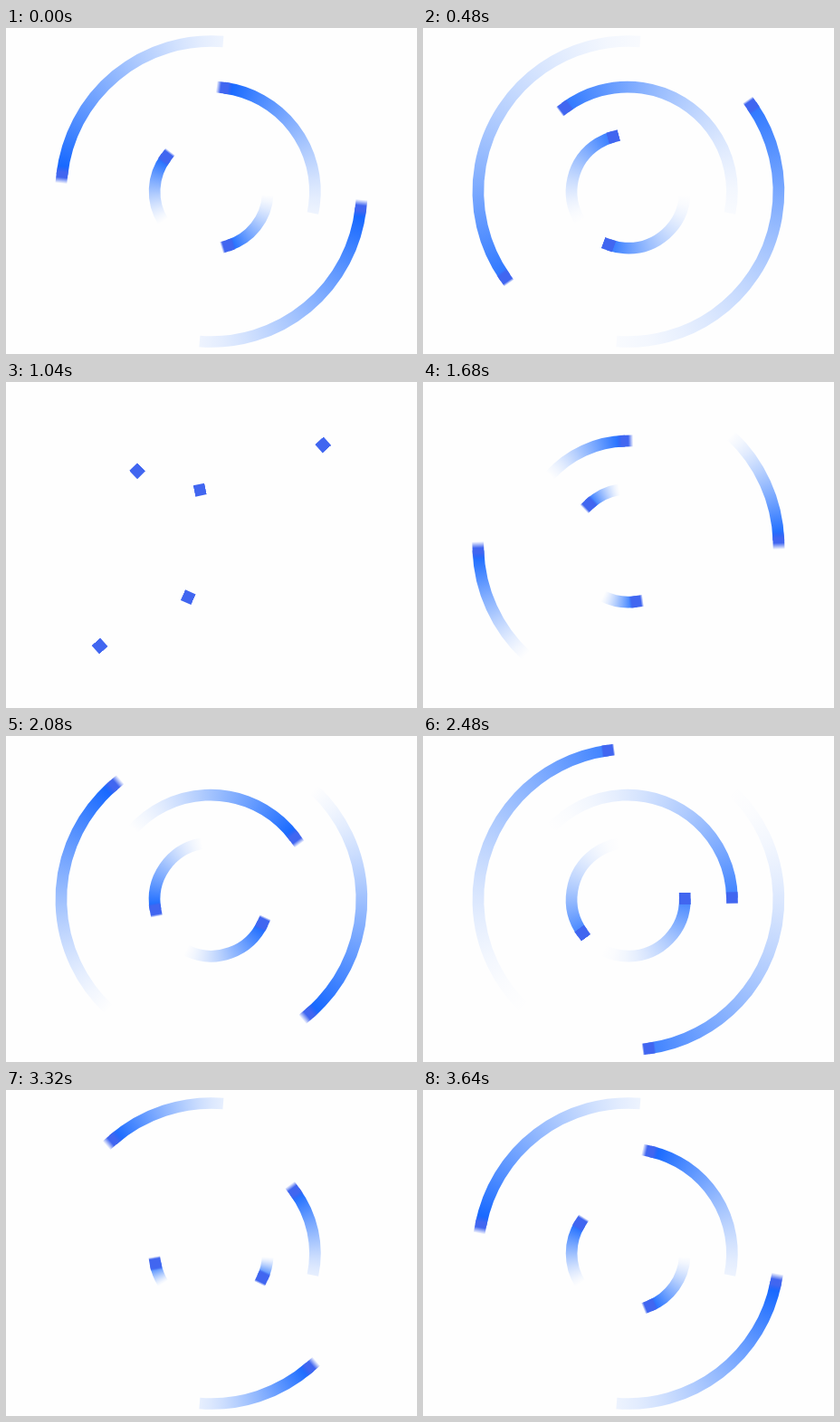
An HTML page with a canvas that plays this animation: 454x360 px, repeating every 3680 ms.

```html
<!DOCTYPE html>
<html lang="en">
<head>
<meta charset="utf-8">
<title>Orbiting arcs</title>
<style>
  html, body { margin: 0; width: 100%; height: 100%; overflow: hidden; background: #fefefe; }
  canvas { display: block; }
</style>
</head>
<body>
<canvas id="stage" width="454" height="360"></canvas>
<script>
const ctx = document.getElementById('stage').getContext('2d');
const LOOP = 3680, CY = 180.5, SIZE = 12.7, SHUTTER = 20;

// Each head swings from angle a to b and back; tails start at tailA / tailB.
const outer = { x: 226.9, r: 166, a: 138, b: 264.5, tailA: 133, tailB: 274.5 };
const middle = { x: 226, r: 115.4, a: 225.5, b: 361.5, tailA: 222, tailB: 372 };
const inner = { x: 226.7, r: 62.6, a: 258.5, b: 142.5, tailA: 261, tailB: 148, soft: true };
const turned = (arc, by) => ({
  ...arc, a: arc.a + by, b: arc.b + by, tailA: arc.tailA + by, tailB: arc.tailB + by
});
const arcs = [outer, turned(outer, -180), middle, inner, turned(inner, -144.5)];

const OUT = { start: 1110, end: 2610, fadeStart: 2360, fadeEnd: 2780, edge: 0 };
const BACK = { start: 2850, end: 4442, fadeStart: 4000, fadeEnd: 4730, edge: 0.14 };

const rad = deg => deg * Math.PI / 180;
const ramp = (t, from, to) => Math.min(1, Math.max(0, (t - from) / (to - from)));
const smooth = x => x * x * (3 - 2 * x);
const sine = x => (1 - Math.cos(Math.PI * x)) / 2;

// Time counted from the start of the outward swing.
const unroll = t => OUT.start + (((t - OUT.start) % LOOP) + LOOP) % LOOP;

function headAngle(arc, t) {
  t = unroll(t);
  let p = t < BACK.start
    ? sine(ramp(t, OUT.start, OUT.end))
    : 1 - sine(ramp(t, BACK.start, BACK.end) ** 0.85);
  if (arc.soft) p = (p + smooth(p)) / 2;
  return arc.a + (arc.b - arc.a) * p;
}

// The trail runs from the head to its anchor, then pales away from the tail on.
function drawTrail(arc, time, head) {
  const t = unroll(time);
  const swing = t < BACK.start ? OUT : BACK;
  const tail = swing === OUT ? arc.tailA : arc.tailB;
  const gone = smooth(ramp(t, swing.fadeStart, swing.fadeEnd));
  const strength = ramp(t, swing.start, swing.start + 200) * (1 - gone);
  if (!strength) return;

  const edge = arc.soft ? 0 : swing.edge * (1 - ramp(t, swing.start, swing.end));
  const first = Math.min(head, tail), last = Math.max(head, tail);
  const span = last - first, pad = 5, steps = 10;
  const fade = ctx.createConicGradient(rad(first - pad), arc.x, CY);
  for (let i = 0; i <= steps; i++) {
    const along = i / steps;
    const u = head < tail ? along : 1 - along;
    const alpha = strength * (edge + (1 - edge) * (1 - u) ** (1.3 + 2 * gone));
    fade.addColorStop((pad + along * span) / 360, `rgba(13,98,255,${alpha.toFixed(4)})`);
  }
  ctx.strokeStyle = fade;
  ctx.lineWidth = SIZE;
  ctx.beginPath();
  ctx.arc(arc.x, CY, arc.r, rad(first), rad(last));
  ctx.stroke();
}

// A square smeared along its path by the shutter time.
function drawHead(arc, t, head) {
  const moved = headAngle(arc, t + SHUTTER / 2) - headAngle(arc, t - SHUTTER / 2);
  const blur = Math.abs(rad(moved)) * arc.r;
  const length = SIZE + blur;
  const fill = ctx.createLinearGradient(0, -length / 2, 0, length / 2);
  fill.addColorStop(0, 'rgba(65,102,240,0)');
  fill.addColorStop(blur / length, 'rgb(65,102,240)');
  fill.addColorStop(SIZE / length, 'rgb(65,102,240)');
  fill.addColorStop(1, 'rgba(65,102,240,0)');
  ctx.save();
  ctx.translate(arc.x, CY);
  ctx.rotate(rad(head));
  ctx.translate(arc.r, 0);
  ctx.fillStyle = fill;
  ctx.fillRect(-SIZE / 2, -length / 2, SIZE, length);
  ctx.restore();
}

function draw() {
  const t = performance.now() % LOOP;
  ctx.fillStyle = '#fefefe';
  ctx.fillRect(0, 0, 454, 360);
  for (const arc of arcs) {
    const head = headAngle(arc, t);
    drawTrail(arc, t, head);
    drawHead(arc, t, head);
  }
  requestAnimationFrame(draw);
}
draw();
</script>
</body>
</html>
```
